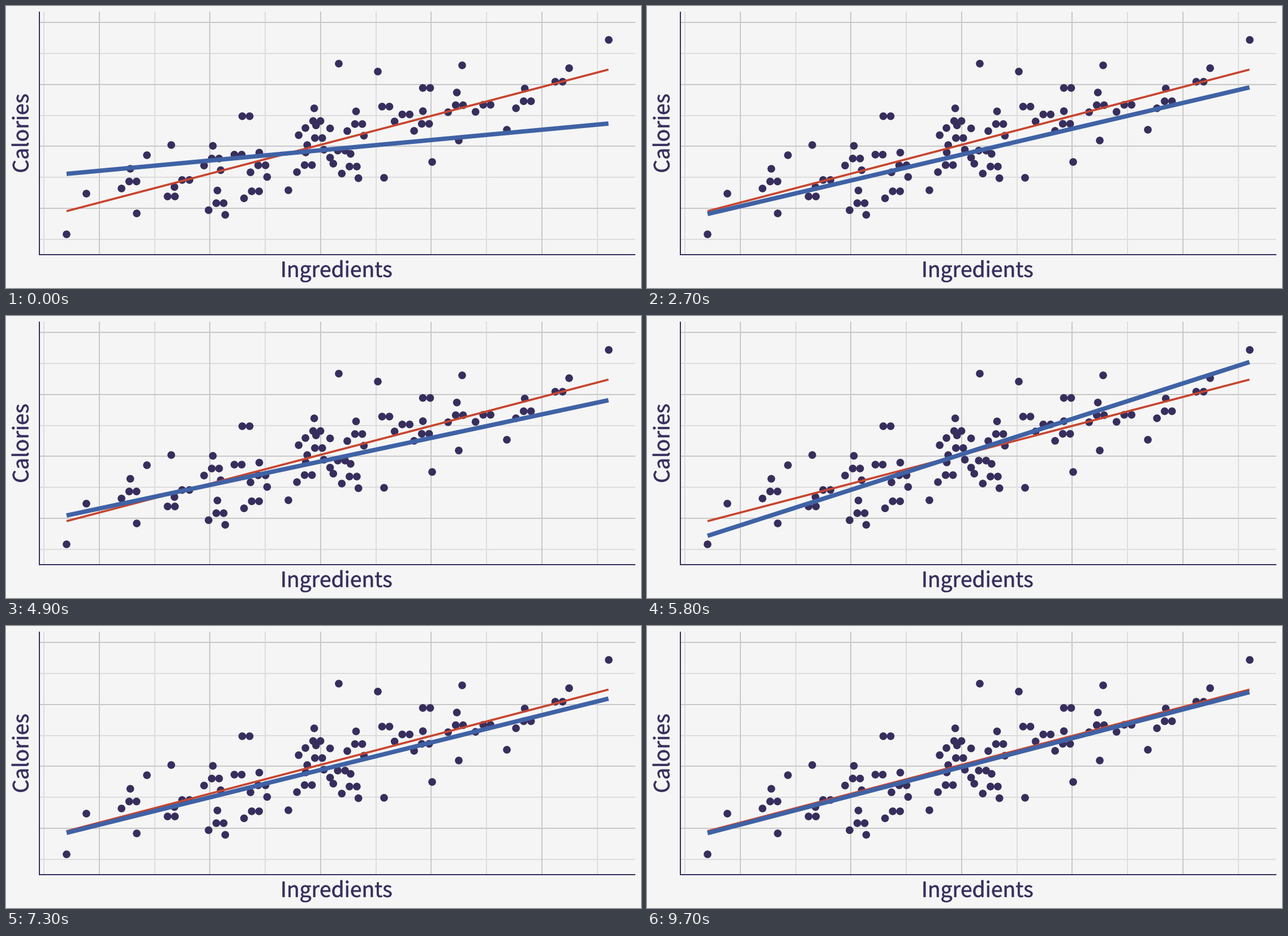
A matplotlib script that plays this animation: 1122x499 px, repeating every 10000 ms.

```python
import numpy as np
import matplotlib.pyplot as plt
from matplotlib.animation import FuncAnimation
from matplotlib.patches import Circle, PathPatch
from matplotlib.textpath import TextPath
from matplotlib.transforms import Affine2D

W, H, DPI = 1122, 499, 64
PAPER, INK = "#f5f5f5", "#372e5d"
RED, BLUE = "#c8452f", "#3f62a5"
MAJOR, MINOR = "#c8c8c8", "#dddddd"
LEFT, RIGHT, TOP, BOTTOM = 59, 1112, 10, 440
FIT_X = (107, 1064.5)

# Centres of the clumps, by the number of dots in each
CLUMPS = {
    1: [(107, 404), (142, 332), (231, 367), (249, 264), (292, 246),
        (499, 326), (588, 102), (657, 116), (668, 304), (753, 276),
        (800, 238), (806, 105), (885, 219), (995, 110), (1065, 60)],
    2: [(292, 337), (410, 263), (424, 195), (671, 178), (743, 145),
        (977, 134)],
    3: [(311, 312), (434, 332), (586, 260), (700, 196), (843, 179)],
    4: [(218, 308), (528, 279), (543, 201), (735, 206), (795, 173),
        (915, 166)],
    5: [(367, 272), (375, 351), (449, 284), (620, 211)],
    6: [(605, 285)],
    7: [(548, 232)],
}

# Step, then height of the moving line at its left and right end
KEYS = np.array([
    (0, 297, 208), (2, 420, 31), (3, 323, 180.5), (7, 368, 144),
    (13, 353, 149), (16, 389, 81.5), (21, 366, 128.5), (23, 386, 89),
    (29, 366.5, 117),
])


def px(size):
    """Pixels to points."""
    return size * 72 / DPI


def clump(center, count, gap=13):
    """Dots on a sunflower spiral around a centre."""
    k = np.arange(count)
    radius, angle = gap * np.sqrt(k), 2.4 * (k - 1)
    spiral = np.column_stack((radius * np.cos(angle), radius * np.sin(angle)))
    return spiral - spiral.mean(axis=0) + center


def rule(xs, ys, color, width, z):
    line, = ax.plot(xs, ys, color=color, lw=px(width), zorder=z,
                    solid_capstyle="butt")
    return line


def grid(x0, y0, nx, ny, color, z):
    for x in x0 + 195.6 * np.arange(nx):
        rule((x, x), (TOP, BOTTOM), color, 2, z)
    for y in y0 + 109.65 * np.arange(ny):
        rule((LEFT, RIGHT), (y, y), color, 2, z)


def label(x, y, text, angle=0):
    """Text centred on x, y along its baseline."""
    path = TextPath((0, 0), text, size=37.2,
                    prop={"family": "Noto Sans CJK JP"})
    box = path.get_extents()
    place = (Affine2D().translate(-(box.x0 + box.x1) / 2, 0)
             .rotate_deg(angle).scale(1, -1).translate(x, y))
    ax.add_patch(PathPatch(place.transform_path(path), fc=INK, ec=INK,
                           lw=px(0.6)))


def step_at(ms):
    """Steps last 400 ms early on and 300 ms later."""
    if ms < 300:
        return 0
    if ms < 4300:
        return 1 + (ms - 300) // 400
    return 11 + (ms - 4300) // 300


def ends(step):
    return [np.interp(step, KEYS[:, 0], KEYS[:, side]) for side in (1, 2)]


def update(frame):
    guess.set_ydata(ends(step_at(frame * 100)))
    return guess,


fig = plt.figure(figsize=(W / DPI, H / DPI), dpi=DPI, facecolor=PAPER)
ax = fig.add_axes((0, 0, 1, 1))
ax.axis("off")

grid(67, 84, 6, 4, MINOR, 1)
grid(164.7, 29, 5, 4, MAJOR, 2)
rule((LEFT, LEFT), (TOP, BOTTOM + 1), INK, 2, 3)
rule((LEFT - 1, RIGHT), (BOTTOM, BOTTOM), INK, 2, 3)
for count, centers in CLUMPS.items():
    for center in centers:
        for dot in clump(center, count):
            ax.add_patch(Circle(dot, 6.8, color=INK, lw=0, zorder=4))
rule(FIT_X, (363, 112.5), RED, 3.7, 5)
guess = rule(FIT_X, ends(0), BLUE, 7.8, 6)
label(585, 479.5, "Ingredients")
label(39.5, 225, "Calories", 90)
ax.set(xlim=(0, W), ylim=(H, 0))

anim = FuncAnimation(fig, update, frames=100, interval=100, repeat=True,
                     cache_frame_data=False)
plt.show()
```
